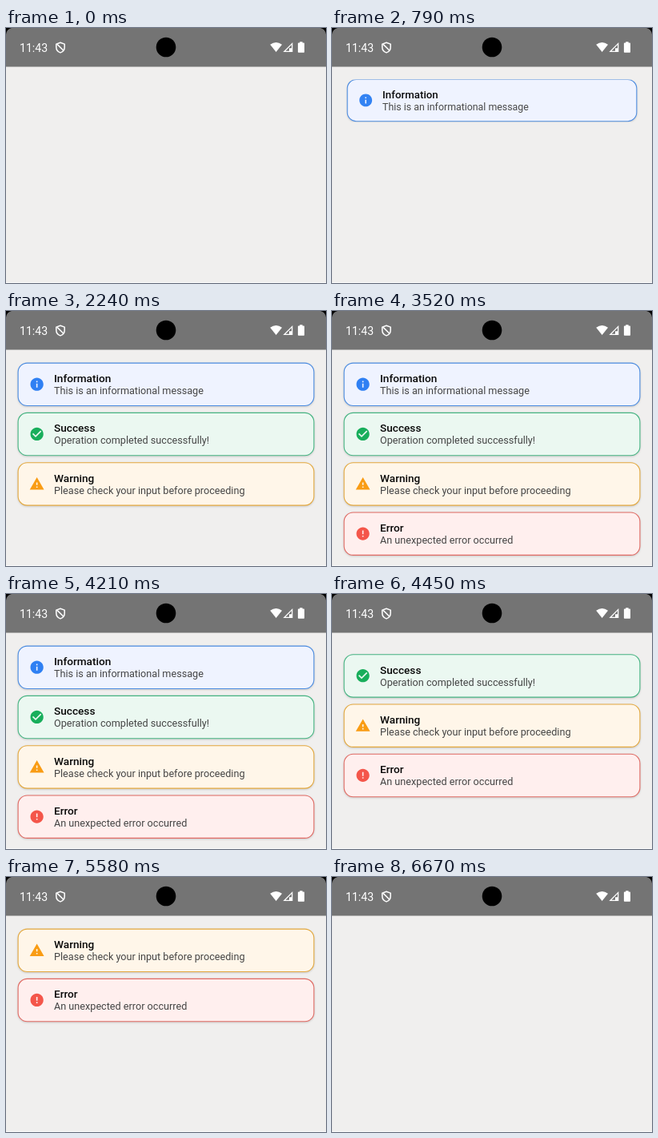
An HTML page for the animation above (7210 ms loop, 400 px wide and 319 px high).

```html
<!DOCTYPE html>
<html lang="en">
<head>
<meta charset="utf-8">
<title>Stacked notifications</title>
<style>
  html, body { margin: 0; width: 100%; height: 100%; overflow: hidden; background: #f0efee; }
  #stage { display: block; width: 400px; height: 319px; font-family: Roboto, "Noto Sans", sans-serif; }
  .panel { filter: drop-shadow(0 1px 1px rgba(0, 0, 0, .16)); }
  .title { font-size: 13.62px; font-weight: 500; fill: #080808; }
  .body { font-size: 12.65px; fill: #454545; }
  .clock { font-size: 14.1px; fill: #fff; }
</style>
</head>
<body>
<svg id="stage" width="400" height="319" viewBox="0 0 400 319">
  <rect width="400" height="319" fill="#f0efee"/>
  <rect y="318" width="400" height="1" fill="#fafafa"/>
  <g id="cards"></g>
  <g id="status">
    <rect width="400" height="48.5" fill="#747474"/>
    <path d="M0 0H7Q1 1 0 8ZM400 0H393Q399 1 400 8Z"/>
    <circle cx="200" cy="24" r="12.3"/>
    <text class="clock" x="17" y="29.6">11:43</text>
    <g fill="none" stroke="#fff" stroke-width="1.5" stroke-linejoin="round">
      <path d="M68 18.2L73.2 20.1V24C73.2 27.4 71 29.8 68 30.9C65 29.8 62.8 27.4 62.8 24V20.1Z"/>
      <path d="M64 20.4L72 28.2"/>
    </g>
    <g fill="#fff">
      <path d="M330.2 20.8Q337.6 15.2 345 20.8L337.6 30Z"/>
      <path fill-rule="evenodd" d="M358.3 18V30H346.3ZM357 21.1L349.4 28.7H354V25.3H357Z"/>
      <path d="M367.2 17.2H370.6V18.5H372.2Q373 18.5 373 19.3V30Q373 30.8 372.2 30.8H365.7Q364.9 30.8 364.9 30V19.3Q364.9 18.5 365.7 18.5H367.2Z"/>
    </g>
  </g>
</svg>
<script>
const LOOP = 7210, SETTLE = 340;
const TOP = 64.6, LEFT = 14.6, WIDTH = 370.8, HEIGHT = 54.4, GAP = 7.9;

const DISC = "M12 2C6.48 2 2 6.48 2 12s4.48 10 10 10 10-4.48 10-10S17.52 2 12 2z";
const CARDS = [
  { title: "Information", body: "This is an informational message",
    enter: 505, leave: 4213, color: "#2f80f3", line: "#4a8be0", fill: "#eff3ff",
    icon: DISC + "m1 15h-2v-6h2v6zm0-8h-2V7h2v2z" },
  { title: "Success", body: "Operation completed successfully!",
    enter: 1227, leave: 4920, color: "#18ae5b", line: "#45b482", fill: "#ebf8f1",
    icon: DISC + "m-2 15l-5-5 1.41-1.41L10 14.17l7.59-7.59L19 8l-9 9z" },
  { title: "Warning", body: "Please check your input before proceeding",
    enter: 1900, leave: 5630, color: "#f99c14", line: "#e3a83e", fill: "#fff6e9",
    icon: "M1 21h22L12 2 1 21zm12-3h-2v-2h2v2zm0-4h-2v-4h2v4z" },
  { title: "Error", body: "An unexpected error occurred",
    enter: 2620, leave: 6330, color: "#f4564a", line: "#e06a63", fill: "#ffefee",
    icon: DISC + "m1 15h-2v-2h2v2zm0-4h-2V7h2v6z" }
];

function add(parent, tag, attrs, text) {
  const el = document.createElementNS("http://www.w3.org/2000/svg", tag);
  for (const key in attrs) el.setAttribute(key, attrs[key]);
  if (text) el.textContent = text;
  return parent.appendChild(el);
}

function build(card) {
  card.frame = add(document.getElementById("cards"), "svg", { x: 0, width: 400 });
  card.group = add(card.frame, "g", {});
  add(card.group, "rect", {
    class: "panel", x: LEFT + .5, y: .5, width: WIDTH - 1, height: HEIGHT - 1,
    rx: 11.4, fill: card.fill, stroke: card.line, "stroke-width": 1.1
  });
  add(card.group, "path", {
    d: card.icon, fill: card.color, "fill-rule": "evenodd",
    transform: "translate(28.9 17.3) scale(.811)"
  });
  add(card.group, "text", { class: "title", x: 60, y: 24.4 }, card.title);
  add(card.group, "text", { class: "body", x: 60, y: 39.5 }, card.body);
}

// Remaining share of a critically damped spring.
function spring(ms) {
  if (ms <= 0) return 1;
  if (ms >= SETTLE) return 0;
  const x = ms * .02;
  return (1 + x) * Math.exp(-x);
}

function draw(time) {
  let y = TOP;
  for (const card of CARDS) {
    const shown = time > card.enter && time < card.leave + SETTLE;
    card.frame.style.display = shown ? "" : "none";
    if (!shown) continue;
    const size = time < card.leave ? 1 - spring(time - card.enter) : spring(time - card.leave);
    const height = HEIGHT * size;
    // Content hangs from the lower edge of its clip and scales about its own centre.
    card.frame.setAttribute("y", y);
    card.frame.setAttribute("height", Math.max(height, .01));
    card.frame.setAttribute("overflow", size < 1 ? "hidden" : "visible");
    card.group.setAttribute("transform",
      `translate(${200 * (1 - size)} ${height - HEIGHT + HEIGHT / 2 * (1 - size)}) scale(${size})`);
    card.group.setAttribute("opacity", size);
    y += height + GAP;
  }
}

CARDS.forEach(build);
const start = performance.now();
function tick() {
  draw((performance.now() - start) % LOOP);
  requestAnimationFrame(tick);
}
tick();
</script>
</body>
</html>
```
